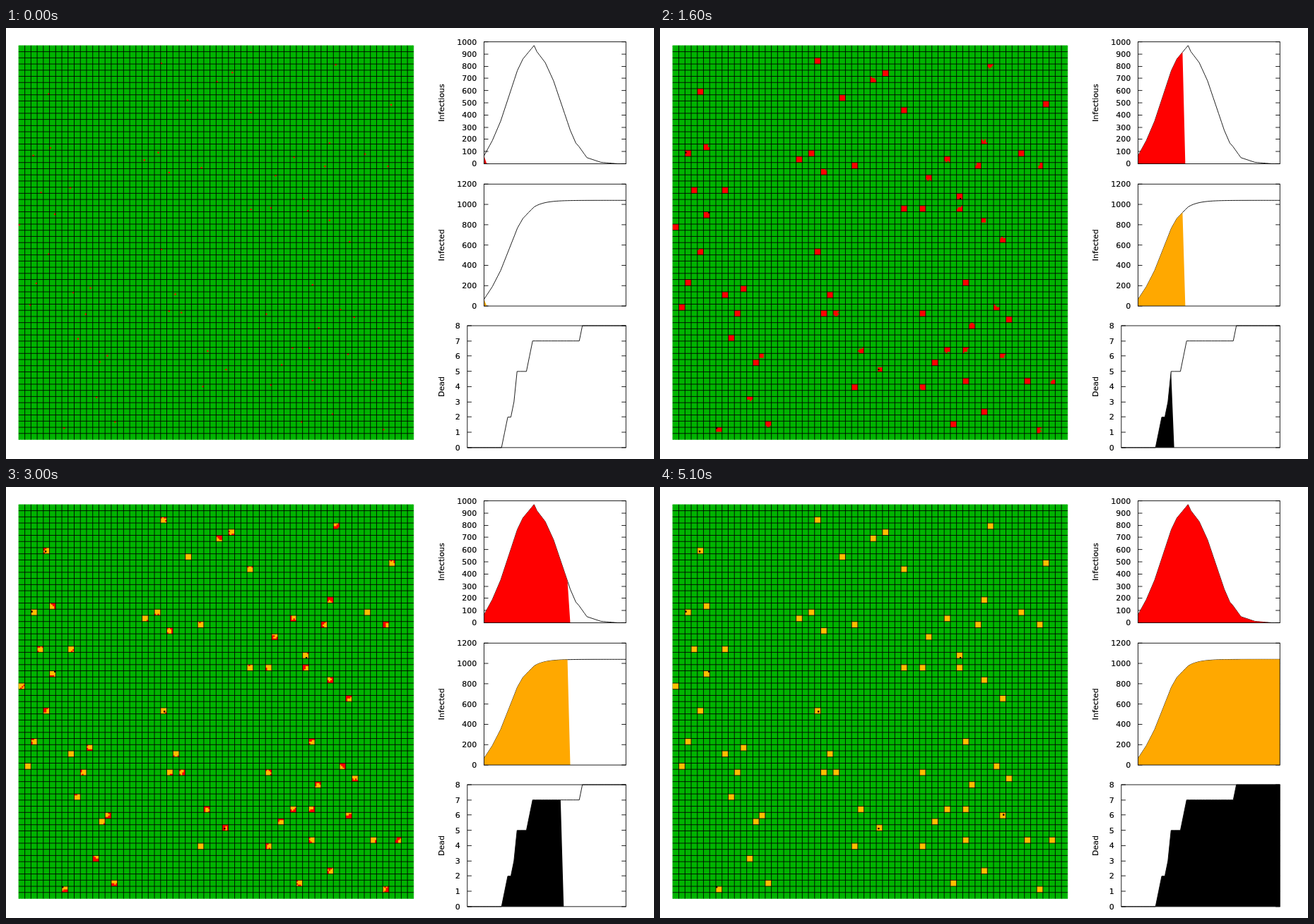
Write an HTML page that moves like this. It is 917 px wide and 611 px high and loops after 5200 ms.

```html
<!DOCTYPE html>
<html lang="en">
<head>
<meta charset="utf-8">
<title>Epidemic on a grid</title>
<style>
html, body { margin: 0; width: 100%; height: 100%; overflow: hidden; background: #fff; }
svg { display: block; width: 917px; height: 611px; }
text { font: 12.6px "DejaVu Sans", sans-serif; stroke: #000; stroke-width: 0.2px; }
</style>
</head>
<body>
<svg id="stage" viewBox="0 0 1050 700" preserveAspectRatio="none"></svg>
<script>
const STEP = 100, STEPS = 52, LAST = STEPS - 1;
const LEFT = 20.5, TOP = 28.5, CELL = 10, SIDE = 64, SIZE = CELL * SIDE, DOT = CELL / 4;
const HOMES = 65, GREEN = '#00b400';
const stage = document.getElementById('stage');

function add(tag, attrs) {
  const el = document.createElementNS('http://www.w3.org/2000/svg', tag);
  for (const k in attrs) el.setAttribute(k, attrs[k]);
  return stage.appendChild(el);
}

let seed = 4711;
function random() {
  seed = (seed * 16807) % 2147483647;
  return seed / 2147483647;
}
const pick = n => Math.floor(random() * n);

// One value per step, straight between the key points.
function series(keys) {
  return Array.from({ length: STEPS }, (_, i) => {
    const k = Math.max(1, keys.findIndex(p => p[0] >= i));
    const [[a, from], [b, to]] = [keys[k - 1], keys[k]];
    return from + (to - from) * (i - a) / (b - a);
  });
}

const infectious = series([[0, 65], [3, 190], [6, 350], [12, 765], [14, 860], [18, 970], [19, 920],
  [22, 830], [25, 680], [31, 275], [33, 170], [34, 145], [37, 50], [42, 12], [48, 0], [51, 0]]);
const dead = series([[0, 0], [11, 0], [13, 2], [14, 2], [15, 3], [16, 5], [19, 5], [21, 7],
  [36, 7], [37, 8], [51, 8]]);
const infected = infectious.map((n, i) =>
  i < 19 ? n + dead[i] : HOMES * (16 - Math.exp((18 - i) / 3.8)));

// A household is a 4 x 4 block; the infection spreads outwards from its first case.
function household(cell) {
  const x = cell % SIDE * 4, y = Math.floor(cell / SIDE) * 4;
  const fx = x + pick(4), fy = y + pick(4);
  const r = random(), pace = 0.45 + 1.05 * r + r ** 8;
  return Array.from({ length: 16 }, (_, k) => {
    const px = x + k % 4, py = y + (k >> 2);
    return { x: px, y: py, reach: Math.hypot(px - fx, py - fy) * (1 + random() * 0.4) };
  }).sort((a, b) => a.reach - b.reach).map((p, i) => {
    const caught = i ? i * pace + random() * 0.6 : -1;
    return { ...p, caught, cured: caught + random() * 10 };
  });
}

const cells = new Set();
while (cells.size < HOMES) cells.add(pick(SIDE * SIDE));
const people = [...cells].flatMap(household).sort((a, b) => a.caught - b.caught);
const victims = people.filter((_, i) => i % 80 === 79).slice(0, 8);
const curing = people.filter(p => !victims.includes(p)).sort((a, b) => a.cured - b.cured);

add('rect', { x: LEFT, y: TOP, width: SIZE, height: SIZE, fill: GREEN });
add('rect', { x: LEFT, y: TOP, width: SIZE, height: SIZE, fill: 'none',
  stroke: GREEN, 'stroke-dasharray': '1.5 1' });
const [sick, well, gone] = ['#f00', '#ffc000', '#000'].map(fill => add('path', { fill }));
let mesh = '';
for (let k = CELL; k < SIZE; k += CELL) {
  mesh += `M${LEFT + k} ${TOP}v${SIZE}M${LEFT} ${TOP + k}h${SIZE}`;
}
add('path', { d: mesh, stroke: '#000' });

const dots = (list, n) => list.slice(0, Math.round(n)).map(p =>
  `M${LEFT + p.x * DOT} ${TOP + p.y * DOT}h${DOT}v${DOT}h-${DOT}z`).join('');

function chart(label, x, y, max, tick, fill, data) {
  const right = 1004.5, h = 198, base = y + h;
  const px = i => x + (right - x) * i / LAST;
  const points = data.map((n, i) => `${px(i).toFixed(2)} ${(base - n / max * h).toFixed(2)}`);
  const line = { fill: 'none', stroke: '#000' };
  let ticks = '';
  for (let v = 0; v <= max; v += tick) {
    const ty = base - Math.round(v / max * h);
    ticks += `M${x} ${ty}h7M${right} ${ty}h-7`;
    add('text', { x: x - 11.5, y: ty + 4.5, 'text-anchor': 'end' }).textContent = v;
  }
  add('text', { transform: `translate(710 ${y + h / 2}) rotate(-90)`, 'text-anchor': 'middle' })
    .textContent = label;
  add('path', { d: ticks, ...line });
  add('path', { d: 'M' + points.join('L'), ...line });
  const area = add('path', { fill });
  add('rect', { x, y, width: right - x, height: h, ...line });
  return n => area.setAttribute('d', `M${x} ${base}L${points.slice(0, n + 1).join('L')}` +
    `L${px(Math.min(n + 1, LAST))} ${base}z`);
}

const charts = [
  chart('Infectious', 774.5, 22.5, 1000, 100, '#f00', infectious),
  chart('Infected', 774.5, 253.5, 1200, 200, '#ffa800', infected),
  chart('Dead', 747.5, 483.5, 8, 1, '#000', dead)
];

let shown = -1;
function draw(n) {
  if (n === shown) return;
  shown = n;
  sick.setAttribute('d', dots(people, infected[n]));
  well.setAttribute('d', dots(curing, infected[n] - infectious[n] - dead[n]));
  gone.setAttribute('d', dots(victims, dead[n]));
  charts.forEach(update => update(n));
}

const start = performance.now();
function loop() {
  draw(Math.floor((performance.now() - start) / STEP) % STEPS);
  requestAnimationFrame(loop);
}
loop();
</script>
</body>
</html>
```
